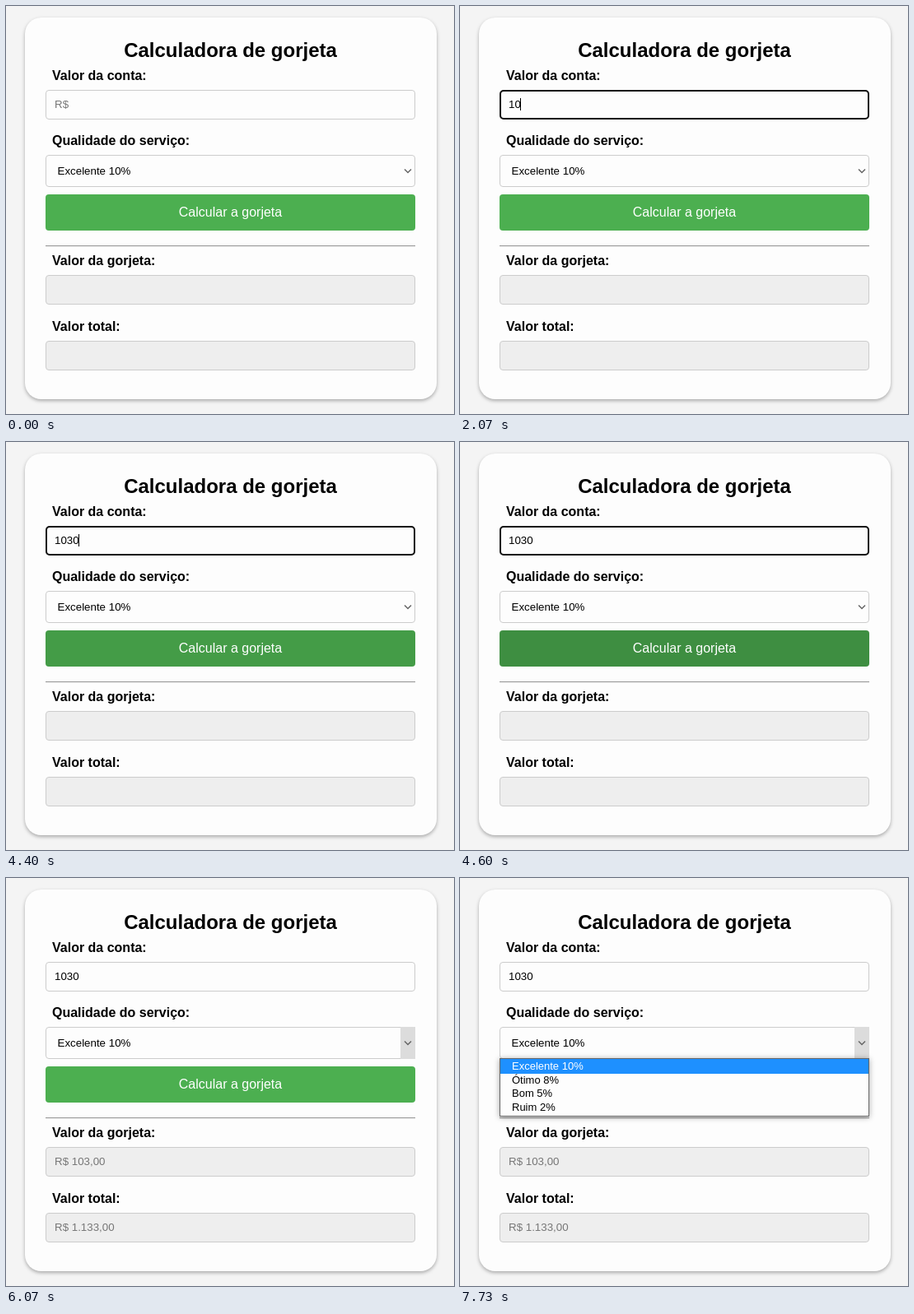
Animation, 544 px wide and 496 px high, one loop 8 s. Source, as an HTML page:

```html
<!DOCTYPE html>
<html lang="pt-BR">
<head>
<meta charset="utf-8">
<title>Calculadora de gorjeta</title>
<style>
  html, body { margin: 0; width: 100%; height: 100%; overflow: hidden; background: #f4f4f4; }
  svg { display: block; width: 100vw; height: 100vh; font: 13.3333px Arial, "Liberation Sans", sans-serif; }
  .title { font-size: 24px; font-weight: bold; text-anchor: middle; }
  .label { font-size: 16px; font-weight: bold; }
  .box { fill: #fdfdfd; stroke: #ccc; }
  .off { fill: #eee; stroke: #ccc; }
  .hint { fill: #777; }
  .card { fill: #fdfdfd; filter: drop-shadow(0 2px 2px rgba(0, 0, 0, .3)); }
  .chevron { fill: none; stroke: #666; stroke-width: 1.5; }
  .options { font-size: 13px; }

  /* One 8 s timeline shared by every part */
  .step { animation: 8s step-end infinite; }
  .placeholder { animation-name: placeholder; }
  .focus { animation-name: focus; }
  .caret { animation-name: caret; }
  .k1 { animation-name: key1; }
  .k2 { animation-name: key2; }
  .k3 { animation-name: key3; }
  .k4 { animation-name: key4; }
  .result { animation-name: result; }
  .arrow { animation-name: arrow; }
  .button { fill: #4caf50; animation: button 8s ease infinite; }
  .list { animation: list 8s linear infinite; }

  @keyframes placeholder { 0% { opacity: 1 } 22.1%, 100% { opacity: 0 } }
  @keyframes focus { 0% { opacity: 0 } 8.5% { opacity: 1 } 57.8%, 100% { opacity: 0 } }
  @keyframes key1 { 0% { fill-opacity: 0 } 22.1%, 100% { fill-opacity: 1 } }
  @keyframes key2 { 0% { fill-opacity: 0 } 25.3%, 100% { fill-opacity: 1 } }
  @keyframes key3 { 0% { fill-opacity: 0 } 31%, 100% { fill-opacity: 1 } }
  @keyframes key4 { 0% { fill-opacity: 0 } 35.5%, 100% { fill-opacity: 1 } }
  @keyframes caret {
    0% { opacity: 0; transform: none }
    8.5% { opacity: 1; transform: none }
    14.6% { opacity: 0; transform: none }
    21.25% { opacity: 1; transform: none }
    22.1% { opacity: 1; transform: translateX(7px) }
    25.3% { opacity: 1; transform: translateX(14px) }
    31% { opacity: 1; transform: translateX(22px) }
    35.5% { opacity: 1; transform: translateX(29px) }
    42.2% { opacity: 0; transform: translateX(29px) }
    48.75% { opacity: 1; transform: translateX(29px) }
    55.4%, 100% { opacity: 0; transform: translateX(29px) }
  }
  @keyframes result { 0% { opacity: 0 } 58.4%, 100% { opacity: 1 } }
  @keyframes arrow { 0% { opacity: 0 } 74.6%, 100% { opacity: 1 } }
  /* The pointer brushes the button, then returns to hover and click it */
  @keyframes button {
    0%, 48.75% { fill: #4caf50 }
    50% { fill: #49a74c }
    51.25%, 53.75% { fill: #4caf50 }
    57.5%, 71.75% { fill: #3e8e41 }
    75.5%, 100% { fill: #4caf50 }
  }
  @keyframes list { 0%, 94.5% { opacity: 0 } 96.6%, 99.99% { opacity: 1 } 100% { opacity: 0 } }
</style>
</head>
<body>
<svg viewBox="0 0 544 496">
  <defs>
    <filter id="glow" x="-5%" y="-30%" width="110%" height="160%">
      <feDropShadow dx="0" dy="1" stdDeviation="3.5" flood-color="#000" flood-opacity=".35"/>
    </filter>
  </defs>

  <rect class="card" x="23" y="14" width="500" height="464" rx="20"/>
  <text class="title" x="272.5" y="62">Calculadora de gorjeta</text>

  <text class="label" x="56" y="90">Valor da conta:</text>
  <rect class="box" x="48.5" y="102.5" width="448" height="35" rx="3.5"/>
  <rect class="step focus" x="49" y="103" width="447" height="34" rx="4" fill="#fdfdfd" stroke="#101010" stroke-width="2"/>
  <text class="hint step placeholder" x="59" y="124">R$</text>
  <text x="59" y="124"><tspan class="step k1">1</tspan><tspan class="step k2">0</tspan><tspan class="step k3">3</tspan><tspan class="step k4">0</tspan></text>
  <rect class="step caret" x="59" y="112" width="1" height="15"/>

  <text class="label" x="56" y="169">Qualidade do serviço:</text>
  <rect class="box" x="48.5" y="181.5" width="448" height="38" rx="3.5"/>
  <rect class="step arrow" x="479" y="181" width="18" height="39" fill="#dcdcdc"/>
  <text x="62.5" y="205">Excelente 10%</text>
  <path class="chevron" d="M484 198.5l4 4 4-4"/>

  <rect class="button" x="48" y="229" width="449" height="44" rx="4"/>
  <text x="272.5" y="256" font-size="16" text-anchor="middle" fill="#fff">Calcular a gorjeta</text>

  <path d="M48 291.5h449" stroke="#9a9a9a"/>
  <path d="M48 292.5h449" stroke="#eee"/>

  <text class="label" x="56" y="315">Valor da gorjeta:</text>
  <rect class="off" x="48.5" y="327.5" width="448" height="35" rx="3.5"/>
  <text class="label" x="56" y="395">Valor total:</text>
  <rect class="off" x="48.5" y="407.5" width="448" height="35" rx="3.5"/>
  <g class="hint step result">
    <text x="59" y="349">R$ 103,00</text>
    <text x="59" y="429">R$ 1.133,00</text>
  </g>

  <g class="list">
    <rect x="48.5" y="219.5" width="448" height="70" fill="#fdfdfd" stroke="#666" filter="url(#glow)"/>
    <rect x="49" y="220" width="447" height="18" fill="#1e90ff"/>
    <g class="options">
      <text x="63" y="233" fill="#fff">Excelente 10%</text>
      <text x="63" y="250">Ótimo 8%</text>
      <text x="63" y="266">Bom 5%</text>
      <text x="63" y="283">Ruim 2%</text>
    </g>
  </g>
</svg>
</body>
</html>
```
